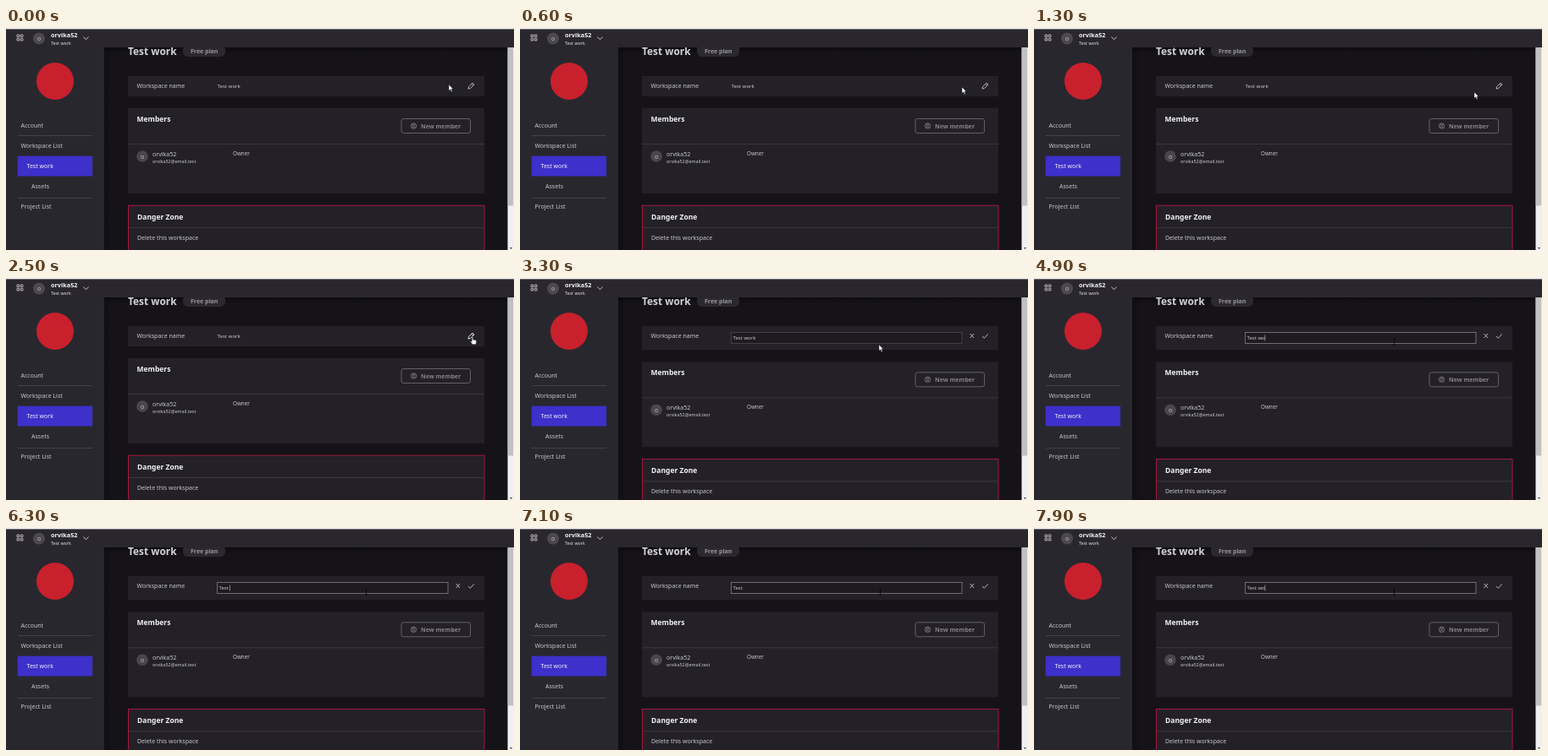
An HTML page for the animation above (8000 ms loop, 600x263 px).

```html
<!DOCTYPE html>
<html lang="en">
<head>
<meta charset="utf-8">
<title>Workspace settings</title>
<style>
  html, body { margin: 0; width: 100%; height: 100%; overflow: hidden; background: #151318; }
  svg { display: block; width: 600px; height: 263px; }
  text { font: 7px "Noto Sans", sans-serif; fill: #c8c7cb; white-space: pre; }
  .b { font-weight: 700; }
  .h { font-size: 8.5px; font-weight: 600; fill: #f2f2f4; }
  .s { font-size: 6px; }
  .panel { fill: #232127; }
  .rule { stroke: #3f3d44; stroke-width: .8; }
  .icon { fill: none; stroke: #c4c3c7; stroke-width: .9; }
</style>
</head>
<body>
<svg viewBox="0 0 600 263">
  <defs>
    <linearGradient id="down" x2="0" y2="1">
      <stop stop-color="#08070a" stop-opacity=".6"/><stop offset="1" stop-color="#08070a" stop-opacity="0"/>
    </linearGradient>
    <linearGradient id="right">
      <stop stop-color="#08070a" stop-opacity=".4"/><stop offset="1" stop-color="#08070a" stop-opacity="0"/>
    </linearGradient>
  </defs>
  <rect width="600" height="263" fill="#151318"/>
  <rect x="116" width="10" height="263" fill="url(#right)"/>
  <rect x="116" y="23" width="477" height="7" fill="url(#down)"/>

  <!-- Main column -->
  <text class="b" x="144" y="32" style="font-size:11.9px;fill:#d3d2d6">Test work</text>
  <rect x="209" y="20" width="50" height="14" rx="6" fill="#2b292f"/>
  <text class="b" x="218" y="30" style="fill:#98969c">Free plan</text>
  <rect id="namePanel" class="panel" x="144" y="57" width="421" height="24"/>
  <text x="154.500" y="71">Workspace name</text>

  <g id="view">
    <text class="s" x="249.500" y="70.700" style="font-size:6.1px">Test work</text>
    <path id="pencil" class="icon" d="M546 72l.6-2.500 4.400-4.400 1.900 1.900-4.400 4.400zM549.800 66.300l1.900 1.900"/>
  </g>
  <g id="edit">
    <rect id="field" x="249.500" y="64.500" width="272.500" height="13" fill="#1d1b20" stroke-width=".9"/>
    <text id="value" class="s" x="251.500" y="73.300"></text>
    <rect id="caret" y="67.500" width=".7" height="7" fill="#b5b4b8"/>
    <path class="icon" d="M531.500 66l4.500 5m0-5l-4.500 5M546 69l2.300 2.300 4.500-5"/>
  </g>

  <g id="lower">
    <rect class="panel" x="144" y="95" width="421" height="101"/>
    <text class="h" x="154.500" y="111">Members</text>
    <rect x="467" y="107.500" width="81.500" height="17" rx="2.500" fill="none" stroke="#69676d" stroke-width=".9"/>
    <g fill="none" stroke="#87858b" stroke-width=".8">
      <circle cx="481.500" cy="116" r="3.200"/><circle cx="481.500" cy="115" r="1.200"/>
      <path d="M479.300 118.200q2.200-2.600 4.400 0"/>
    </g>
    <text class="b" x="490" y="118.600" style="fill:#858389">New member</text>
    <path class="rule" d="M144 137.500h421"/>
    <circle cx="161" cy="152" r="6.800" fill="#49474d"/>
    <text x="161" y="154.500" text-anchor="middle">o</text>
    <text x="173" y="152">orvika52</text>
    <text x="173" y="160" style="font-size:5.400px">orvika52@email.test</text>
    <text x="268" y="151" style="font-size:6.300px">Owner</text>
    <rect x="144.500" y="210.200" width="420.500" height="70" fill="#232127" stroke="#a3183b"/>
    <text class="h" x="155" y="226.500">Danger Zone</text>
    <path class="rule" d="M145 236.500h419"/>
    <text x="155" y="251">Delete this workspace</text>
  </g>

  <!-- Scrollbar -->
  <rect x="592.500" y="23" width="7.500" height="240" fill="#f0f0f0"/>
  <rect x="592.800" y="23" width="6.400" height="187.500" fill="#c1c1c1"/>
  <path d="M594.800 260h3.400l-1.700 2z" fill="#505050"/>

  <!-- Sidebar -->
  <rect y="22" width="116" height="241" fill="#29272e"/>
  <circle cx="58" cy="63" r="22" fill="#c9202d"/>
  <text x="17.500" y="118">Account</text>
  <text x="17.500" y="142">Workspace List</text>
  <path class="rule" d="M14 127.500h88M14 201.500h88" style="stroke:#4c4a51"/>
  <rect x="13.700" y="151.700" width="88.400" height="23.800" fill="#3d30cb"/>
  <text x="24.500" y="166" style="fill:#f4f4f8">Test work</text>
  <text x="30" y="190">Assets</text>
  <text x="17.500" y="214">Project List</text>

  <!-- Top bar -->
  <rect width="600" height="23" fill="#29272d"/>
  <rect width="600" height="1.300" fill="#f3f3f3"/>
  <path class="icon" d="M13 8h2.600v2.600h-2.600zM17.300 8h2.600v2.600h-2.600zM13 12.300h2.600v2.600h-2.600zM17.300 12.300h2.600v2.600h-2.600z"/>
  <circle cx="39" cy="12.500" r="7" fill="#4b494f"/>
  <text x="39" y="15" text-anchor="middle">o</text>
  <text class="b" x="53" y="10.500" style="font-size:7.300px;fill:#f2f2f4">orvika52</text>
  <text x="53" y="20" style="font-size:5.300px;fill:#e2e2e4">Test work</text>
  <path class="icon" d="M91.500 10.500l3 3.200 3-3.200" style="stroke-width:1"/>

  <g id="pointer">
    <path id="arrow" d="M0 0v7.200l1.700-1.500 1.200 2.700 1.200-.5-1.200-2.700h2.200z" fill="#fff" stroke="#111" stroke-width=".4"/>
    <path id="hand" d="M-.8 0q.8-.8 1.500 0v3l3.300.8q.8.3.7 1.200l-.7 3.700h-4l-2.700-3.500q.5-1 1.900.2z" fill="#fff" stroke="#111" stroke-width=".5"/>
    <path id="beam" d="M-1.200-3.500h2.400M0-3.500v7M-1.200 3.500h2.400" stroke="#050505" stroke-width=".8"/>
  </g>
</svg>
<script>
const $ = id => document.getElementById(id);
const show = (id, on) => $(id).style.display = on ? "" : "none";
const LOOP = 8000, EDIT = 2600, FOCUS = 4000;

// time, x, y of the pointer
const path = [
  [0, 523, 67], [600, 522, 70], [1300, 520, 76], [1800, 521, 76], [2300, 551, 70],
  [2600, 551, 70], [3200, 424, 79], [3500, 424, 79], [3800, 425.5, 75.5], [LOOP, 425.5, 75.5]
];
// time and text left in the field
const edits = [
  [FOCUS, "Test work"], [4700, "Test wor"], [4900, "Test wo"], [5100, "Test w"],
  [5300, "Test "], [7400, "Test w"], [7700, "Test wo"]
];

function pointerAt(t) {
  const i = path.findIndex(p => p[0] > t);
  const [t0, x0, y0] = path[i - 1], [t1, x1, y1] = path[i];
  const u = (t - t0) / (t1 - t0), k = u * u * (3 - 2 * u);
  return [x0 + (x1 - x0) * k, y0 + (y1 - y0) * k];
}

function draw(t) {
  const editing = t >= EDIT, focused = t >= FOCUS;
  const [x, y] = pointerAt(t);
  const hand = !editing && x > 544;
  const beam = editing && x < 522 && y < 78;
  const [since, text] = edits.findLast(e => e[0] <= t) || edits[0];

  show("view", !editing);
  show("edit", editing);
  $("namePanel").setAttribute("height", editing ? 28 : 24);
  $("lower").setAttribute("transform", `translate(0 ${editing ? 4.3 : 0})`);
  $("pencil").style.stroke = hand ? "#fff" : "#c4c3c7";
  $("field").style.stroke = focused ? "#78767c" : "#454349";

  $("value").textContent = text;
  show("caret", focused && (t - since) % 1000 < 500);
  if (editing) $("caret").setAttribute("x", 251.3 + $("value").getComputedTextLength());

  $("pointer").setAttribute("transform", `translate(${x} ${y})`);
  show("hand", hand);
  show("beam", beam);
  show("arrow", !hand && !beam);
}

const start = performance.now();
function tick() {
  const t = (performance.now() - start) % LOOP;
  draw(Math.floor(t / 100) * 100);
  requestAnimationFrame(tick);
}
tick();
</script>
</body>
</html>
```
